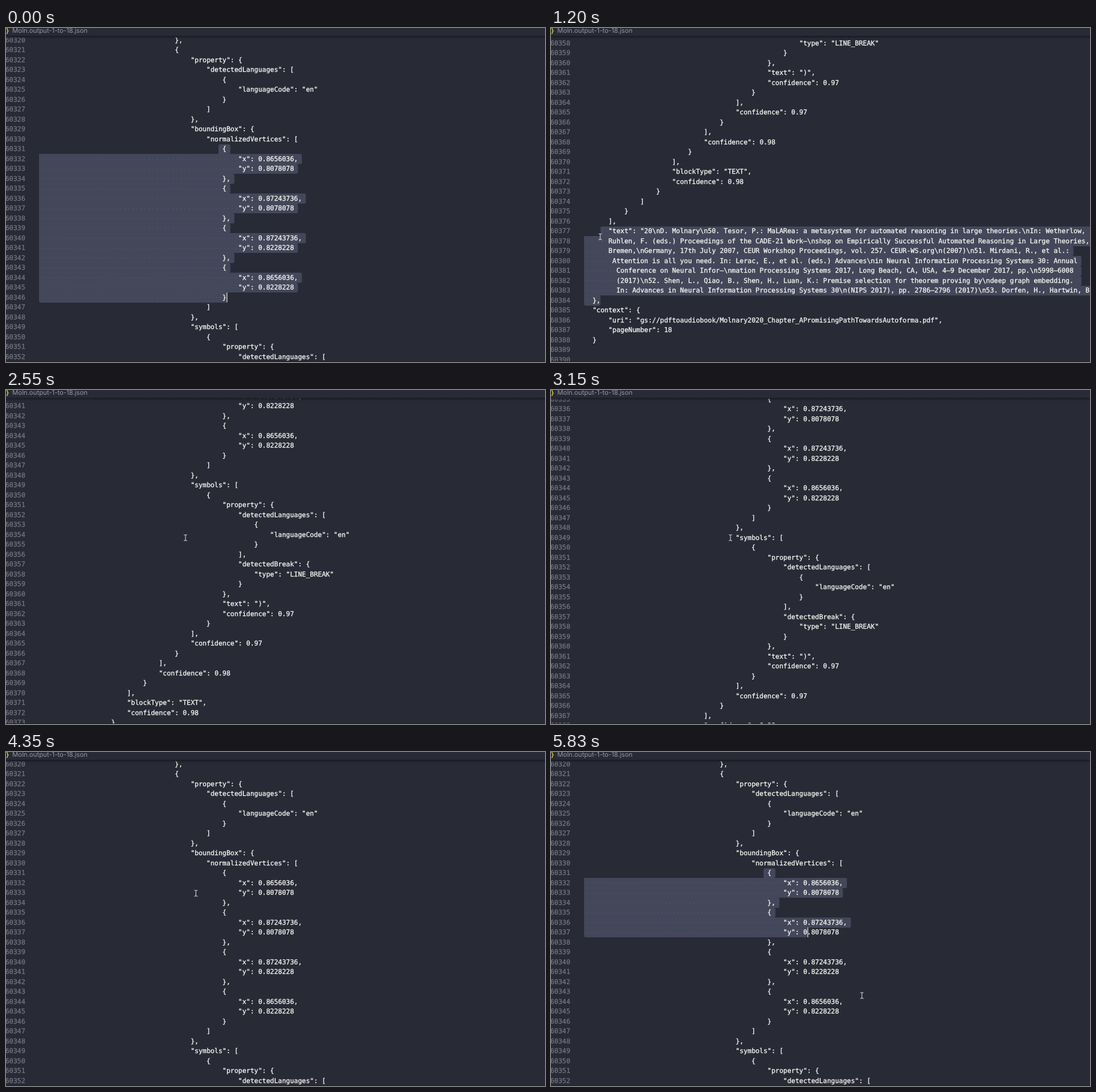
An HTML page with a canvas that plays this animation: 898 px wide and 557 px high, repeating every 5930 ms.

```html
<!DOCTYPE html>
<html lang="en">
<head>
<meta charset="utf-8">
<title>JSON viewer</title>
<style>
html, body { margin: 0; height: 100%; overflow: hidden; background: #282a36; }
canvas { display: block; }
</style>
</head>
<body>
<canvas id="stage" width="898" height="557"></canvas>
<script>
const ctx = document.getElementById('stage').getContext('2d');
const LOOP = 5930, FIRST = 60320;
const EDGE = 55, LEFT = 56, TOP = 12, ROW = 16.5, CHAR = 6.622;
const MONO = '11px "DejaVu Sans Mono", monospace';

const vertex = (x, y) => `{\n"x": ${x},\n"y": ${y}\n}`;
const language = '"property": {\n"detectedLanguages": [\n{\n"languageCode": "en"\n}\n]';
const source = String.raw`},
{
${language}
},
"boundingBox": {
"normalizedVertices": [
${vertex('0.8656036', '0.8078078')},
${vertex('0.87243736', '0.8078078')},
${vertex('0.87243736', '0.8228228')},
${vertex('0.8656036', '0.8228228')}
]
},
"symbols": [
{
${language},
"detectedBreak": {
"type": "LINE_BREAK"
}
},
"text": ")",
"confidence": 0.97
}
],
"confidence": 0.97
}
],
"confidence": 0.98
}
],
"blockType": "TEXT",
"confidence": 0.98
}
]
}
],
"text": "20\nD. Molnary\n50. Tesor, P.: MaLARea: a metasystem for automated reasoning in large theories.\nIn: Wetherlow,${' '}
Ruhlen, F. (eds.) Proceedings of the CADE-21 Work–\nshop on Empirically Successful Automated Reasoning in Large Theories,${' '}
Bremen,\nGermany, 17th July 2007, CEUR Workshop Proceedings, vol. 257. CEUR-WS.org\n(2007)\n51. Mirdani, R., et al.:
 Attention is all you need. In: Lerac, E., et al. (eds.) Advances\nin Neural Information Processing Systems 30: Annual
  Conference on Neural Infor–\nmation Processing Systems 2017, Long Beach, CA, USA, 4–9 December 2017, pp.\n5998–6008${' '}
  (2017)\n52. Shen, L., Qiao, B., Shen, H., Luan, K.: Premise selection for theorem proving by\ndeep graph embedding.${' '}
  In: Advances in Neural Information Processing Systems 30\n(NIPS 2017), pp. 2786–2796 (2017)\n53. Dorfen, H., Hartwin, B.
},
"context": {
"uri": "gs://pdftoaudiobook/Molnary2020_Chapter_APromisingPathTowardsAutoforma.pdf",
"pageNumber": 18
}

`;

// Indent every line by its nesting depth
let depth = 38;
const lines = source.split('\n').map(text => {
  if (/^[}\]]/.test(text)) depth -= 4;
  const line = text && ' '.repeat(depth) + text;
  if (/[{[]$/.test(text)) depth += 4;
  return line;
});

// Tracks: [time, value, ...]
const scrollTrack = [[150, 0], [300, 170], [450, 540], [600, 622], [1800, 622], [1950, 608], [2100, 563],
  [2400, 400], [2550, 340], [2700, 310], [3000, 285], [3150, 252.5], [3450, 252.5], [3600, 212],
  [3750, 120], [3900, 48], [4050, 15], [4200, 3], [4350, 0]];
const mouseTrack = [[600, 84, 458], [900, 82, 348], [1200, 82, 348], [1350, 165, 303], [1500, 255, 263],
  [1650, 299, 246.5], [4200, 299, 246], [4640, 350, 215], [4790, 352, 208], [4930, 352, 205],
  [5080, 352, 205], [5230, 368, 231], [5830, 518, 406]];
const dragTrack = [[5230, 355, 201], [5830, 428, 300]];

function at(track, t) {
  const next = track.findIndex(k => k[0] > t);
  if (next < 0) return track[track.length - 1].slice(1);
  if (next === 0) return track[0].slice(1);
  const a = track[next - 1], b = track[next];
  const u = (t - a[0]) / (b[0] - a[0]);
  return a.slice(1).map((v, i) => v + (b[i + 1] - v) * u);
}

// The screen is sampled every 150 ms, with two shorter gaps late in the loop
function sample(t) {
  const start = t >= 4930 ? 4930 : t >= 4640 ? 4640 : 0;
  return start + Math.floor((t - start) / 150) * 150;
}

// Returns selection as { from, to, caret }, each [line, column]
function selection(t) {
  if (t < 600) return { from: [11, 45], to: [26, 47], caret: [26, 47] };
  if (t < 5230) {
    const line = Math.round(64 - 7 * Math.min(1, (t - 600) / 300));
    return { from: [line, 4], to: [64, 4], caret: [line, 4] };
  }
  const [x, y] = at(dragTrack, t);
  const line = Math.floor((y - TOP) / ROW);
  const col = Math.min(lines[line].length, Math.round((x - LEFT) / CHAR));
  return { from: [11, 45], to: [line, col], caret: [line, col] };
}

const colX = col => LEFT + col * CHAR;

function drawSelection({ from, to }, rowY) {
  for (let i = from[0]; i <= to[0]; i++) {
    const first = i === from[0] ? from[1] : 0;
    const last = i === to[0] ? to[1] : lines[i].length + 1;
    const y = Math.round(rowY(i)), h = Math.round(rowY(i + 1)) - y;
    const x = first ? colX(first) : EDGE;
    ctx.fillStyle = '#44475a';
    ctx.beginPath();
    ctx.roundRect(x, y, colX(last) - x, h, [i === from[0] ? 3 : 0, 3, 3, i === to[0] ? 3 : 0]);
    ctx.fill();
    ctx.fillStyle = '#62657a';
    const dots = Math.min(last, lines[i].search(/\S/));
    for (let c = first; c < dots; c++) ctx.fillRect(colX(c + 0.5) - 0.5, y + 8, 1, 1);
  }
}

function drawActiveLine(rowY) {
  ctx.fillStyle = '#44475a';
  ctx.fillRect(EDGE, rowY(11), 843, 1.8);
  ctx.fillRect(EDGE, rowY(12) - 1.8, 843, 1.8);
  ctx.strokeStyle = '#6a7f70';
  ctx.lineWidth = 1;
  for (const [line, col] of [[10, 64], [27, 42]])
    ctx.strokeRect(colX(col) + 0.5, Math.round(rowY(line)) + 0.5, 6.6, 15);
}

// A hairline outline gives the slightly heavy text smoothing
function drawText(text, x, y, color) {
  ctx.fillStyle = ctx.strokeStyle = color;
  ctx.lineWidth = 0.3;
  ctx.fillText(text, x, y);
  ctx.strokeText(text, x, y);
}

function drawMouse(x, y) {
  ctx.strokeStyle = '#d0d0d4';
  ctx.lineWidth = 1.1;
  ctx.beginPath();
  for (const s of [-1, 1]) {
    ctx.moveTo(x - 2.8, y + s * 5);
    ctx.quadraticCurveTo(x, y + s * 5, x, y + s * 3.5);
    ctx.quadraticCurveTo(x, y + s * 5, x + 2.8, y + s * 5);
  }
  ctx.moveTo(x, y - 4);
  ctx.lineTo(x, y + 4);
  ctx.stroke();
}

function drawHeader() {
  ctx.fillStyle = '#282a36';
  ctx.fillRect(0, 0, 898, 13);
  const shade = ctx.createLinearGradient(0, 13, 0, 18);
  shade.addColorStop(0, '#191a21');
  shade.addColorStop(1, '#191a2100');
  ctx.fillStyle = shade;
  ctx.fillRect(0, 13, 898, 5);
  ctx.fillStyle = '#d9d62e';
  ctx.font = 'bold 10px "DejaVu Sans Mono", monospace';
  ctx.fillText('}', -0.5, 7.5);
  ctx.fillStyle = '#9596a0';
  ctx.font = '10.8px Inter, sans-serif';
  ctx.fillText('Moln.output-1-to-18.json', 10.5, 7.5);
}

function draw(t) {
  const [scroll] = at(scrollTrack, t);
  const rowY = i => TOP + i * ROW - scroll;
  const sel = selection(t);
  const collapsed = t >= 5230 && t < 5380;

  ctx.textRendering = 'geometricPrecision';
  ctx.fillStyle = '#282a36';
  ctx.fillRect(0, 0, 898, 557);
  if (collapsed) drawActiveLine(rowY);
  else drawSelection(sel, rowY);

  ctx.font = MONO;
  lines.forEach((line, i) => {
    const y = rowY(i) + 11.5;
    if (y < 0 || y > 575) return;
    drawText(FIRST + i, -1, y, '#73757f');
    const indent = line.search(/\S/);
    if (indent >= 0) drawText(line.slice(indent), colX(indent), y, '#f8f8f2');
  });

  if (t < 900 || (t >= 1950 && t < 3000) || t >= 5230) {
    ctx.fillStyle = '#c4c4c6';
    ctx.fillRect(colX(sel.caret[1]) + 0.2, rowY(sel.caret[0]), 1.5, ROW);
  }
  if (t >= 600) drawMouse(...at(mouseTrack, t));
  drawHeader();
  ctx.fillStyle = '#1f2029';
  ctx.fillRect(0, 556, 898, 1);
}

function tick() {
  draw(sample(performance.now() % LOOP));
  requestAnimationFrame(tick);
}
tick();
</script>
</body>
</html>
```
